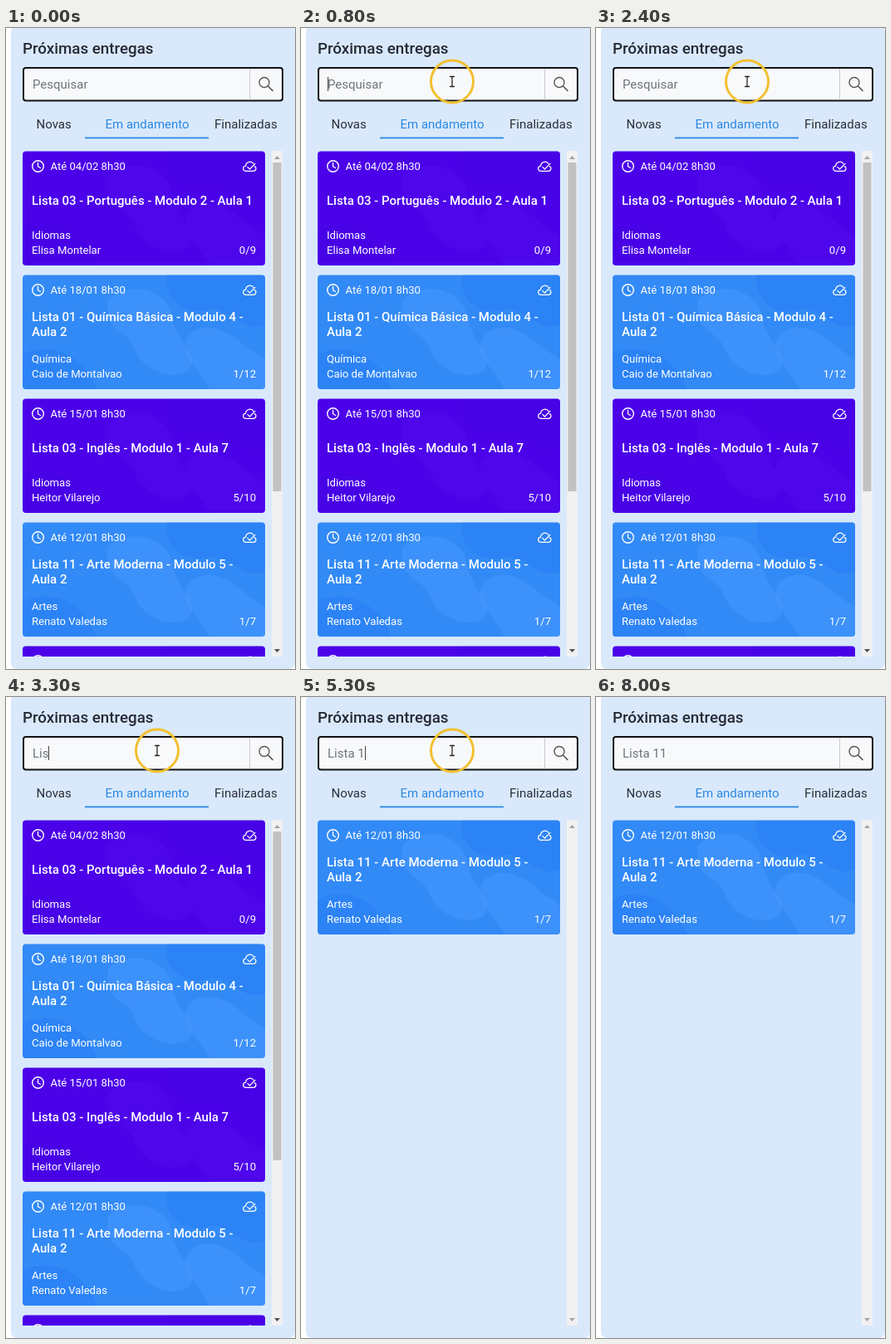
Recreate the animation shown at these times as an HTML page with a canvas. Size 348 px wide and 772 px high, loop 8.2 s.

```html
<!DOCTYPE html>
<html lang="pt-BR">
<head>
<meta charset="utf-8">
<title>Próximas entregas</title>
<style>
  html, body { margin: 0; width: 100%; height: 100%; overflow: hidden; background: #fff; }
  canvas { display: block; width: 348px; height: 772px; }
</style>
</head>
<body>
<canvas id="stage"></canvas>
<script>
const W = 348, H = 772, LOOP = 8200, STEP = 100;
const canvas = document.getElementById('stage');
const ctx = canvas.getContext('2d');
const dpr = window.devicePixelRatio || 1;
canvas.width = W * dpr;
canvas.height = H * dpr;

const LIST = { x: 20, y: 148, w: 292, h: 609, pitch: 149, cardH: 138 };
const PURPLE = { base: '#4b02e9', light: 'rgba(95,25,240,.16)', dark: 'rgba(55,0,205,.13)' };
const BLUE = { base: '#328af6', light: 'rgba(80,157,255,.36)', dark: 'rgba(35,120,240,.36)' };

const CARDS = [
  { due: '04/02 8h30', title: ['Lista 03 - Português - Modulo 2 - Aula 1'], subject: 'Idiomas', teacher: 'Elisa Montelar', count: '0/9', theme: PURPLE },
  { due: '18/01 8h30', title: ['Lista 01 - Química Básica - Modulo 4 -', 'Aula 2'], subject: 'Química', teacher: 'Caio de Montalvao', count: '1/12', theme: BLUE },
  { due: '15/01 8h30', title: ['Lista 03 - Inglês - Modulo 1 - Aula 7'], subject: 'Idiomas', teacher: 'Heitor Vilarejo', count: '5/10', theme: PURPLE },
  { due: '12/01 8h30', title: ['Lista 11 - Arte Moderna - Modulo 5 -', 'Aula 2'], subject: 'Artes', teacher: 'Renato Valedas', count: '1/7', theme: BLUE },
  { due: '10/01 8h30', title: ['Lista 02'], subject: 'Idiomas', teacher: '', count: '', theme: PURPLE }
];

const QUERY = 'Lista 11';
const KEY_TIMES = [2900, 3050, 3250, 3400, 3480, 4800, 5000, 5500];
const FOCUS_TIME = 700;
const BLINK = 500;

function text(str, x, y, size, color, weight = 400, align = 'left') {
  ctx.font = `${weight} ${size}px Roboto, sans-serif`;
  ctx.fillStyle = color;
  ctx.textAlign = align;
  ctx.fillText(str, x, y);
}

function box(x, y, w, h, r, fill) {
  ctx.beginPath();
  ctx.roundRect(x, y, w, h, r);
  ctx.fillStyle = fill;
  ctx.fill();
}

function stroke(path, color, width) {
  ctx.strokeStyle = color;
  ctx.lineWidth = width;
  ctx.lineCap = ctx.lineJoin = 'round';
  ctx.stroke(new Path2D(path));
}

function ring(x, y, r, color, width) {
  ctx.beginPath();
  ctx.arc(x, y, r, 0, Math.PI * 2);
  ctx.strokeStyle = color;
  ctx.lineWidth = width;
  ctx.stroke();
}

function triangle(x, y, dir, color) {
  ctx.beginPath();
  ctx.moveTo(x - 3.5, y - 2 * dir);
  ctx.lineTo(x + 3.5, y - 2 * dir);
  ctx.lineTo(x, y + 2 * dir);
  ctx.fillStyle = color;
  ctx.fill();
}

function blobs(theme) {
  ctx.fillStyle = theme.light;
  ctx.fill(new Path2D('M103 30C130 6 174 18 180 50C186 84 213 96 201 115C180 130 143 115 134 87C126 66 96 70 103 30Z'));
  ctx.fill(new Path2D('M201 72C223 54 250 68 270 88L292 102V138H225C212 111 184 95 201 72Z'));
  ctx.fillStyle = theme.dark;
  ctx.fill(new Path2D('M174 0H292V60C263 72 250 35 220 43C195 50 168 28 174 0Z'));
  ctx.fill(new Path2D('M0 96C32 80 72 94 89 138H0Z'));
}

function drawCard(card, y) {
  ctx.save();
  ctx.translate(LIST.x, y);
  ctx.save();
  box(0, 0.5, LIST.w, LIST.cardH - 0.5, 4, card.theme.base);
  ctx.clip();
  blobs(card.theme);
  ctx.restore();

  ring(18.5, 18.5, 6.8, '#fff', 1.4);
  stroke('M18.5 14.3V18.7L21.5 20.5', '#fff', 1.3);
  stroke('M276 24.3H269C264.8 24.3 264.5 18.8 268.6 18.2C269 12.7 276 11.7 278 15.6', '#fff', 1.2);
  stroke('M270.8 19.3L273.5 22L280 15.4M276 24.3H278C281.7 24.3 281.7 19.2 279.2 18.7', '#fff', 1.2);

  text('Até ' + card.due, 33.5, 23, 13.125, '#fff');
  const first = card.title.length > 1 ? 56 : 65;
  card.title.forEach((line, i) => text(line, 11, first + i * 18, 15, '#fff', 500));
  text(card.subject, 11, 106, 13.125, '#fff');
  text(card.teacher, 11, 124.3, 13.125, '#fff');
  text(card.count, 281, 124.3, 13.125, '#fff', 400, 'right');
  ctx.restore();
}

function drawList(cards) {
  ctx.save();
  ctx.beginPath();
  ctx.rect(LIST.x, LIST.y, LIST.w, LIST.h);
  ctx.clip();
  cards.forEach((card, i) => drawCard(card, LIST.y + i * LIST.pitch));
  ctx.restore();

  const scrollable = cards.length > 4;
  box(320, LIST.y, 13, LIST.h, 0, '#f1f1f1');
  if (scrollable) box(321.5, 162, 10, 396, 0, '#c1c1c1');
  triangle(326.5, 156, -1, '#a3a3a3');
  triangle(326.5, 750, 1, scrollable ? '#505050' : '#a3a3a3');
}

function drawSearch(typed, caretOn) {
  box(20, 47, 314, 41.5, 4, '#101114');
  box(22, 49, 310, 37.5, 2, '#f8f9fa');
  box(293, 49, 1, 37.5, 0, '#c9cbd0');
  ring(311, 65.5, 6, '#555', 1.4);
  stroke('M315.5 70L321 75.5', '#555', 1.7);
  text(typed || 'Pesquisar', 32, 73, 15, '#70757b');
  if (caretOn) {
    const x = 32 + (typed ? ctx.measureText(typed).width : 0);
    box(Math.round(x), 59, 1, 17, 0, '#444');
  }
}

function drawTabs() {
  text('Novas', 36.5, 121, 15, '#2b2e38');
  text('Em andamento', 119.5, 121, 15, '#2b87e3');
  text('Finalizadas', 251, 121, 15, '#2b2e38');
  box(95, 131.5, 149, 1.8, 0, '#2b87e3');
}

const ease = p => p * p * (3 - 2 * p);
const progress = (t, from, to) => ease(Math.min(1, Math.max(0, (t - from) / (to - from))));

function drawPointer(t) {
  const enter = 1 - progress(t, 100, 600);
  const leave = progress(t, 6300, 6900);
  const x = 182 + 20 * enter + 196 * leave;
  const y = 64.5 - 98 * enter - 95 * leave;
  ring(x, y, 25.5, '#f2c02f', 3);
  const beam = `M${x - 2.5} ${y - 6}H${x + 2.5}M${x} ${y - 6}V${y + 6}M${x - 2.5} ${y + 6}H${x + 2.5}`;
  stroke(beam, 'rgba(255,255,255,.8)', 3);
  stroke(beam, '#222', 1.3);
}

function draw(t) {
  const keys = KEY_TIMES.filter(k => k <= t);
  const typed = QUERY.slice(0, keys.length);
  const lastInput = keys.length ? keys[keys.length - 1] : FOCUS_TIME;
  const caretOn = t >= FOCUS_TIME && (t - lastInput) % (2 * BLINK) < BLINK;
  const cards = CARDS.filter(card => card.title[0].startsWith(typed));

  ctx.setTransform(dpr, 0, 0, dpr, 0, 0);
  ctx.fillStyle = '#fff';
  ctx.fillRect(0, 0, W, H);
  box(6, -3, 342, 775, 7, '#d9e9fb');
  text('Próximas entregas', 20, 31, 18.75, '#262a35', 500);
  drawSearch(typed, caretOn);
  drawTabs();
  drawList(cards);
  drawPointer(t);
}

function frame(now) {
  draw(Math.floor((now % LOOP) / STEP) * STEP);
  requestAnimationFrame(frame);
}
requestAnimationFrame(frame);
</script>
</body>
</html>
```
